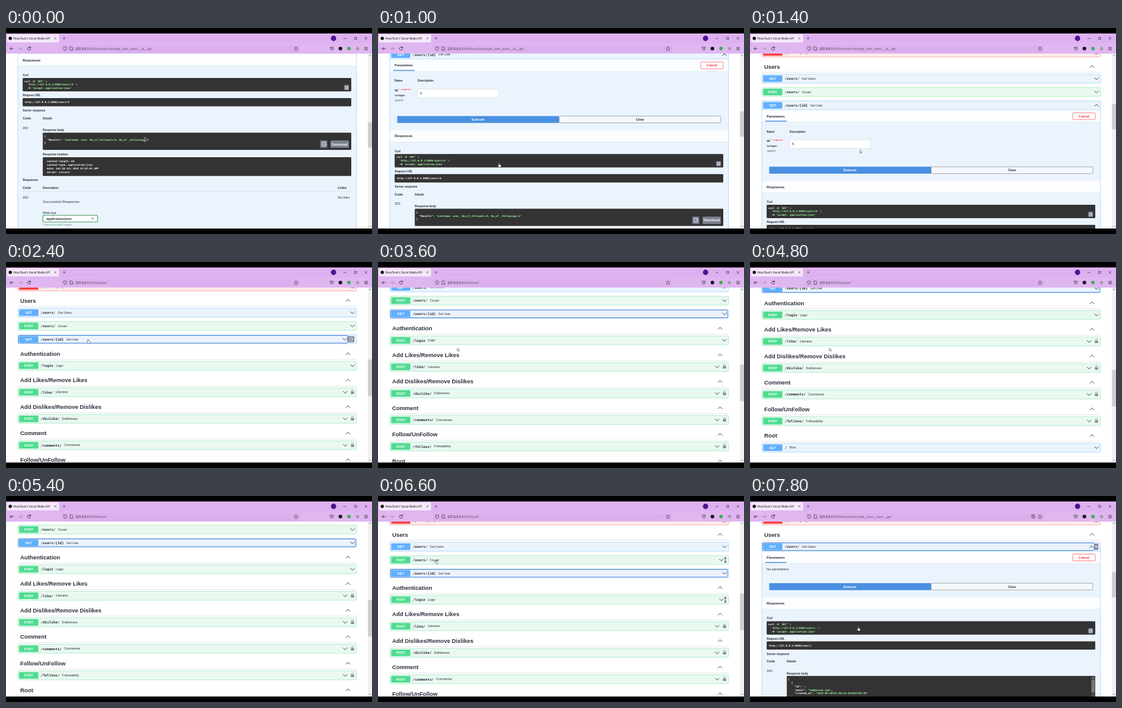
These frames come from a looping animation (600 px wide and 338 px high, 8000 ms). An HTML page:

```html
<!DOCTYPE html>
<html lang="en">
<head>
<meta charset="utf-8">
<title>API docs</title>
<style>
  html, body { margin: 0; width: 100%; height: 100%; overflow: hidden; background: #000; }
  svg { display: block; width: 100%; height: 100%; }
  text { font-family: "Liberation Sans", Arial, sans-serif; white-space: pre; }
  .mono { font-family: "DejaVu Sans Mono", "Liberation Mono", monospace; }
</style>
</head>
<body>
<svg id="stage" viewBox="0 0 600 338"></svg>
<script>
const STEP = 200, LOOP = 8000;
const INK = '#2b303c', CODE_BG = '#333333', GREY = '#7d8293';
const METHODS = {
  GET: { main: '#61affe', soft: '#ebf4fd', edge: '#8fc4f8' },
  POST: { main: '#4fdc90', soft: '#e9f9f0', edge: '#86e2b0' },
  DELETE: { main: '#f93e3e', soft: '#fdeaea', edge: '#f98a8a' }
};

// Page coordinates: centre y of every heading and operation while all are folded.
const HEADINGS = [[63, 'Users'], [150.3, 'Authentication'], [193.8, 'Add Likes/Remove Likes'],
  [237.4, 'Add Dislikes/Remove Dislikes'], [280.8, 'Comment'], [324.4, 'Follow/UnFollow'], [368, 'Root']];
const ROWS = [
  { y: 40.2, method: 'DELETE', path: '/posts/{id}', note: 'Delete Post', lock: true },
  { y: 83.2, method: 'GET', path: '/users/', note: 'Get Users', id: 'list' },
  { y: 105, method: 'POST', path: '/users/', note: 'Cruser' },
  { y: 126.8, method: 'GET', path: '/users/{id}', note: 'Get User', id: 'one' },
  { y: 170.2, method: 'POST', path: '/login', note: 'Login' },
  { y: 213.7, method: 'POST', path: '/like/', note: 'Likeness', lock: true },
  { y: 257.3, method: 'POST', path: '/dislike/', note: 'Dislikeness', lock: true },
  { y: 300.7, method: 'POST', path: '/comments/', note: 'Commentar', lock: true },
  { y: 344.3, method: 'POST', path: '/follows/', note: 'Followability', lock: true },
  { y: 388, method: 'GET', path: '/', note: 'Root' }
];

// [step, scroll, pointer x, pointer y]
const TRACK = [[0, 208, 228, 183], [1, 205, 226, 185], [5, 83.2, 198.5, 222], [7, 0, 180, 200],
  [10, 0, 134.5, 127], [13, 0, 134.5, 127], [14, 0, 130, 141], [16, 41.6, 130, 141], [19, 41.6, 130, 141],
  [24, 83.3, 130, 141], [25, 83.3, 130, 141], [30, 0, 130, 141], [31, 0, 130, 141], [32, 0, 115, 168],
  [33, 0, 95, 105], [34, 0, 91, 85], [38, 0, 95, 85], [39, 0, 177.5, 215]];
const FOLD_STEP = 11, UNFOLD_STEP = 35;

function pose(step) {
  const next = Math.max(1, TRACK.findIndex(k => k[0] >= step));
  const a = TRACK[next - 1], b = TRACK[next], p = (step - a[0]) / (b[0] - a[0]);
  const [, scroll, x, y] = a.map((v, i) => v + (b[i] - v) * p);
  const open = step < FOLD_STEP ? 'one' : step >= UNFOLD_STEP ? 'list' : '';
  const focus = step < FOLD_STEP ? '' : step >= UNFOLD_STEP ? 'list' : 'one';
  return { step, scroll, x, y, open, focus };
}

const text = (s, x, y, size, { fill = INK, bold, anchor = 'start', italic, mono } = {}) =>
  `<text x="${x}" y="${y + size * .35}" font-size="${size}" fill="${fill}" text-anchor="${anchor}"` +
  `${bold ? ' font-weight="700"' : ''}${italic ? ' font-style="italic"' : ''}${mono ? ' class="mono"' : ''}>${s}</text>`;
const rect = (x, y, w, h, fill, { r = 0, stroke = 'none', sw = .5 } = {}) =>
  `<rect x="${x}" y="${y}" width="${w}" height="${h}" rx="${r}" fill="${fill}" stroke="${stroke}" stroke-width="${sw}"/>`;
const line = (d, stroke = INK, sw = .8) =>
  `<path d="${d}" fill="none" stroke="${stroke}" stroke-width="${sw}" stroke-linecap="round"/>`;
const dot = (x, y, r, fill) => `<circle cx="${x}" cy="${y}" r="${r}" fill="${fill}"/>`;
const chevron = (x, y, up, size = 3.2) => {
  const d = up ? -size / 4 : size / 4;
  return line(`M${x - size} ${y - 2 * d}L${x} ${y + 2 * d}L${x + size} ${y - 2 * d}`, INK, .9);
};
const label = (s, x, y) => text(s, x, y, 4.69, { bold: true });

function code(lines, x, y) {
  return lines.map((s, i) => {
    const painted = s
      .replace(/('[^']*'|(?<=": )"[^"]*")/g, '<tspan fill="#a2fca2">$1</tspan>')
      .replace(/(?<=": )\d+/, '<tspan fill="#d36363">$&</tspan>');
    return text(painted, x, y + i * 5.75, 4.17, { fill: '#fff', bold: true, mono: true });
  }).join('');
}

const lock = (x, y) => rect(x - 2.6, y - .8, 5.2, 3.8, '#8a8a8a', { r: .5 }) +
  line(`M${x - 1.6} ${y - 1}v-.8a1.6 1.6 0 0 1 3.2 0v.8`, '#8a8a8a', .9);

function copyButton(x, y, w, h) {
  const cx = x + w / 2, cy = y + h / 2, k = Math.min(w, h) * .22;
  return rect(x, y, w, h, GREY, { r: 1 }) +
    rect(cx - k, cy - k * 1.2, 2 * k, 2.4 * k, 'none', { stroke: '#fff', sw: .7 }) +
    line(`M${cx} ${cy}h${k * 1.5}`, '#fff', .6);
}

const isOver = (row, at) => Math.abs(at.y + at.scroll - row.y) < 7.3;

// The copy button of an operation grows in and shrinks away around the hover.
function copyWidth(row, now, before) {
  if (row.lock) return 0;
  const over = isOver(row, now), was = isOver(row, before);
  return over && was ? 10.5 : over !== was ? (row.id && row.id === now.open ? 6 : 3) : 0;
}

function operation(row, now, before) {
  const { y, method, path, note } = row, { main, soft, edge } = METHODS[method];
  const open = row.id && row.id === now.open;
  const w = copyWidth(row, now, before), left = 571 - w;
  let out = rect(19.5, y - 7.3, 555, open ? 620 : 14.6, soft, { r: 1.5, stroke: edge, sw: .6 });
  if (open) out += line(`M19.5 ${y + 7.2}H574.5`, edge, .5);
  out += rect(21.5, y - 5.4, 31.5, 10.8, main, { r: 1.2 }) +
    text(method, 37.2, y, 5.47, { fill: '#fff', bold: true, anchor: 'middle' }) +
    text(path, 57, y, 5.7, { bold: true, mono: true }) +
    text(note, 61 + path.length * 3.43, y, 5.08);
  out += chevron(row.lock ? 556 : w ? left - 5 : 568, y, open);
  if (row.lock) out += lock(568, y - .3);
  if (w) out += copyButton(left, y - 5, w, 10);
  if (row.id && row.id === now.focus)
    out += rect(20.7, y - 6.2, (w ? left - .6 : 573) - 20.7, 12.4, 'none', { r: 1, stroke: '#3d7bd6', sw: .9 });
  return out;
}

const sectionHead = (s, y) => rect(19.8, y + 9.3, 554.4, .9, '#d8e1ea') +
  rect(19.8, y - 9.8, 554.4, 19.4, '#fbfdff') + text(s, 27.3, y, 5.47, { bold: true });

function parameters(y, buttonsY) {
  return sectionHead('Parameters', y) + rect(25, y + 7.3, 35, 1.5, '#4990e2') +
    rect(529, y - 5.6, 37, 11, '#fff', { r: 1.2, stroke: '#ff6060', sw: .8 }) +
    text('Cancel', 547.5, y, 5.3, { fill: '#f03040', bold: true, anchor: 'middle' }) +
    rect(31.5, buttonsY - 5.7, 265.5, 11.4, '#4990e2', { r: 1 }) +
    rect(297, buttonsY - 5.5, 265, 11, '#f5f9fd', { r: 1, stroke: '#888', sw: .7 }) +
    text('Execute', 164, buttonsY, 5.47, { fill: '#fff', bold: true, anchor: 'middle' }) +
    text('Clear', 429.5, buttonsY, 5.47, { bold: true, anchor: 'middle' });
}

function responses(y, url) {
  const block = (x, dy, h) => rect(x, y + dy, 566 - x, h, CODE_BG, { r: 1.4 });
  return sectionHead('Responses', y) +
    label('Curl', 27.5, y + 24.6) + block(27.3, 29.4, 22) +
    code(["curl -X 'GET' \\", `  '${url}' \\`, "  -H 'accept: application/json'"], 30, y + 34.6) +
    copyButton(554.3, y + 41, 8, 8.4) +
    label('Request URL', 27.5, y + 58) + block(27.3, 62.4, 13.6) + code([url], 31.3, y + 69.3) +
    label('Server response', 27.5, y + 83) +
    text('Code', 27.3, y + 95.5, 5.47, { bold: true }) + label('Details', 60.3, y + 95.5) +
    text('200', 27.3, y + 111, 5.47) + label('Response body', 60.3, y + 115);
}

function userPanel() {
  const y = 260.6;
  return parameters(144.7, 233.3) +
    label('Name', 27.3, 170) + label('Description', 65, 170) +
    text('id', 27.3, 185, 6.25, { bold: true }) + text('* required', 34.6, 183.7, 4.4, { fill: '#f02020' }) +
    text('integer', 27.3, 194, 4.17, { bold: true, mono: true }) +
    text('(path)', 27.3, 201.3, 4.17, { italic: true, mono: true }) +
    rect(65, 183.3, 132.7, 14.2, '#fff', { r: 1.2, stroke: '#d0d5da', sw: .6 }) + text('6', 69, 190.5, 5.6) +
    responses(y, 'http://127.0.0.1:8000/users/6') +
    rect(60.3, y + 119.2, 505.7, 28.2, CODE_BG, { r: 1.4 }) +
    code(['{', '  "Results": "username: user, No_of_followers:0, No_of _followings:1"', '}'], 62.8, y + 124.9) +
    copyButton(515.3, y + 132, 11.4, 12) + rect(532, y + 132, 30, 12, GREY, { r: 1.2 }) +
    text('Download', 547, y + 138, 5.47, { fill: '#fff', bold: true, anchor: 'middle' }) +
    label('Response headers', 60.3, y + 155) + rect(60.3, y + 159.4, 505.7, 30.8, CODE_BG, { r: 1.4 }) +
    code(['content-length: 68', 'content-type: application/json', 'date: Sat,08 Oct 2022 07:07:01 GMT',
      'server: uvicorn'], 67, y + 166.4) +
    label('Responses', 27.5, y + 197.2) +
    text('Code', 27.3, y + 209.5, 5.47, { bold: true }) + label('Description', 60.3, y + 209.5) +
    text('Links', 544, y + 209.5, 5.47, { bold: true }) +
    line(`M27 ${y + 215.8}H566`, '#c9d2dc', .4) +
    text('200', 27.3, y + 225.3, 5.47) + text('No links', 544, y + 225.3, 5.47, { italic: true }) +
    text('Successful Response', 60.3, y + 232.3, 6.25) + text('Media type', 60.3, y + 250.6, 4.5) +
    rect(60.5, y + 254.7, 89.5, 11, '#fff', { r: 1.2, stroke: '#3f9a55', sw: 1.1 }) +
    text('application/json', 66, y + 260.2, 5.47, { bold: true }) + chevron(142, y + 260.2, false, 1.7) +
    text('Controls <tspan class="mono">Accept</tspan> header.', 60.3, y + 270.2, 4.3, { fill: '#3f9a55' });
}

function listPanel() {
  const y = 176;
  return parameters(101, 148.7) + text('No parameters', 27.3, 120, 5.47) +
    responses(y, 'http://127.0.0.1:8000/users/') +
    rect(60.3, y + 119.2, 505.7, 150, CODE_BG, { r: 1.4 }) +
    rect(559.3, y + 119.6, 6.4, 150, '#4a4a4a') + rect(559.8, y + 126, 5.4, 20, '#777') +
    line(`M561 ${y + 123.6}l1.5 -1.6l1.5 1.6`, '#ccc', .7) +
    code(['[', '  {', '    "id": 1,', '    "email": "ned@vorqi.com",',
      '    "created_at": "2022-09-30T21:56:45.621847+05:30"', '  },'], 62.8, y + 124.9);
}

function page(now, before) {
  const openRow = ROWS.find(r => r.id && r.id === now.open);
  const shown = y => !openRow || y <= openRow.y;
  const heads = HEADINGS.filter(([y]) => shown(y)).map(([y, s]) =>
    text(s, 23.2, y + .4, 9.37, { bold: true }) + chevron(560.8, y, true) + line(`M19.5 ${y + 9.6}H574.5`, '#c8cad0', .5));
  const rows = ROWS.filter(r => shown(r.y)).map(r => operation(r, now, before));
  const panel = now.open === 'one' ? userPanel() : now.open ? listPanel() : '';
  return `<g transform="translate(0 ${-now.scroll})">${heads.join('')}${rows.join('')}${panel}</g>`;
}

function scrollbar({ open, scroll }) {
  const scale = 279 / (open ? 1936 : 1340);
  return rect(593.3, 41, 6.7, 289, '#f0f0f0') +
    rect(593.6, 46 + (547 + scroll) * scale, 6.4, 288 * scale, '#cdcdcd') +
    line('M595.4 45.5l1.5 -1.5l1.5 1.5M595.4 325l1.5 1.5l1.5 -1.5', '#555', .7);
}

function browser({ open }) {
  const tail = { one: 'Users/get_user_users__id__get', list: 'Users/get_users_users__get' }[open] || '';
  const grey = '#6b5a70';
  return rect(0, 0, 600, 9, '#000') + rect(0, 9, 600, 16, '#ddb1f0') + rect(0, 25, 600, 17, '#e0b6f1') +
    rect(1.5, 10.5, 85.5, 13.3, '#f5e8fa', { r: 1.4 }) + dot(7, 17, 2.7, '#111') +
    text("HexaTovin's Social Media API", 12, 17, 4.57, { fill: '#222' }) +
    line('M79.6 15.6l2.8 2.8m0 -2.8l-2.8 2.8M93.3 17h4m-2 -2v4', '#222', .5) +
    dot(537, 17, 4.4, '#4b1590') +
    line('M553.5 17.2h4M588.2 15.2l3.6 3.6m0 -3.6l-3.6 3.6', '#222', .6) +
    rect(571.3, 15.2, 3.6, 3.6, 'none', { stroke: '#222', sw: .6 }) +
    line('M12 33.8h-5.2m2.2 -2.2l-2.2 2.2l2.2 2.2', '#222') +
    line('M20.8 33.8h5.2m-2.2 -2.2l2.2 2.2l-2.2 2.2', '#9c84a2') +
    line('M39.9 32.3a2.6 2.6 0 1 0 .4 2.2M40.3 30.9v1.8h-1.8', '#222') +
    rect(90.5, 27.7, 391.5, 12.2, '#dbaeed', { r: 1.4 }) +
    line('M97 31l2.4 .8v1.8q0 2.2 -2.4 3.2q-2.4 -1 -2.4 -3.2v-1.8z', '#333', .7) +
    line('M105.4 31h2.4l1.4 1.4v4.2h-3.8z', '#333', .7) +
    text(`127.0.0.1<tspan fill="${grey}">:8000/docs#/${tail}</tspan>`, 114, 33.9, 5.2, { fill: '#15101a' }) +
    (open === 'list' ? rect(462, 31, 4.6, 5.4, 'none', { r: .6, stroke: '#333', sw: .7 }) +
      line('M463.2 32.7h2.2m-2.2 1.7h2.2', '#333', .5) : '') +
    line('M475.5 30.7l1 2.1l2.3 .3l-1.7 1.6l.4 2.3l-2 -1.1l-2 1.1l.4 -2.3l-1.7 -1.6l2.3 -.3z', '#333', .6) +
    line('M531.6 31.3h5v2.3a2.5 2.5 0 0 1 -5 0zM532.9 33l1.2 1.1l1.2 -1.1', '#333', .7) +
    dot(548.2, 33.7, 3, '#151515') + dot(562.3, 33.7, 2.9, '#3cb054') + dot(576.3, 33.7, 2.8, '#a99bad') +
    line('M587.8 31.8h5m-5 2h5m-5 2h5', '#222', .7);
}

function pointer(now) {
  const at = d => `<path transform="translate(${now.x} ${now.y})" d="${d}" fill="#fff" stroke="#333" stroke-width=".5" stroke-linejoin="round"/>`;
  if (now.step < 2) return line(`M${now.x - 1.2} ${now.y - 3}h2.4m-1.2 0v6m-1.2 0h2.4`, '#ddd', .6);
  if (ROWS.some(r => isOver(r, now)))
    return at('M-.6 0q.6 -.8 1.2 0v2.2l2.3 .6q.6 .3 .4 1.1l-.6 2.4h-3l-1.9 -2.4q0 -.9 1.6 -.1z');
  return at('M0 0v5l1.2 -1.1l.9 1.9l.8 -.4l-.8 -1.8h1.5z');
}

const stage = document.getElementById('stage');
let drawn = -1;

function frame(time) {
  const step = Math.floor((time % LOOP) / STEP);
  if (step !== drawn) {
    drawn = step;
    const now = pose(step), before = pose(Math.max(0, step - 1));
    stage.innerHTML = rect(0, 0, 600, 338, '#fff') + page(now, before) + scrollbar(now) +
      browser(now) + rect(0, 329, 600, 9, '#000') + pointer(now);
  }
  requestAnimationFrame(frame);
}
frame(0);
</script>
</body>
</html>
```
